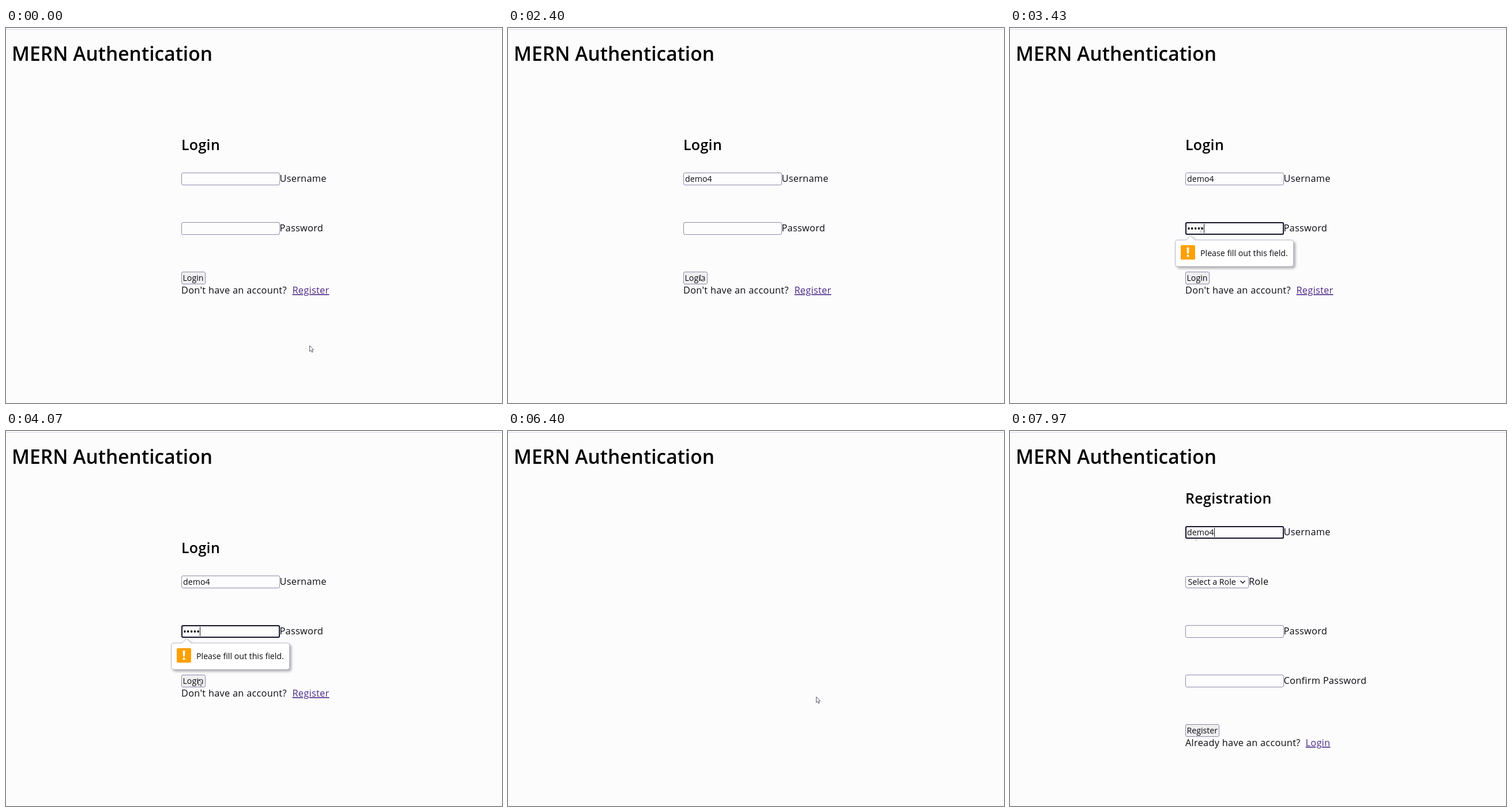
Animation, 860 px wide and 651 px high, one loop 8 s. Source, as an HTML page:

```html
<!DOCTYPE html>
<html lang="en">
<head>
<meta charset="utf-8">
<title>MERN Authentication</title>
<style>
  html, body { margin: 0; width: 100%; height: 100%; overflow: hidden; background: #fcfcfd; }
  body { position: relative; font-family: "Open Sans", "Noto Sans", sans-serif; font-weight: 500; color: #0a0a10; }
  svg { position: absolute; left: 0; top: 0; overflow: visible; }
  text { font-size: 16.3px; letter-spacing: .3px; fill: #0a0a10; }
  .h1 { font-size: 33.5px; font-weight: 600; letter-spacing: .05px; fill: #000; }
  .h2 { font-size: 25px; font-weight: 600; fill: #000; }
  .small { font-size: 14.2px; letter-spacing: 0; }
  .link { fill: #4b2a86; text-decoration: underline; text-decoration-thickness: 1px; }

  .page, .field, .focus, .val { position: absolute; box-sizing: border-box; }
  .page { inset: 0; }
  .field { left: 304px; width: 170.5px; height: 22px; background: #fdfdfe;
    border: 1px solid #8d8ba9; border-radius: 3px; }
  .focus { inset: -1px; border: 2px solid #14142c; border-radius: 3px; }
  .val { left: 2px; top: 0; height: 20px; line-height: 20px; display: flex; align-items: center; white-space: nowrap; }
  .val i { font-style: normal; font-size: 0; animation: key 8s step-end infinite; }
  .dots i { animation-name: dot; }
  .caret { width: 1px; height: 16px; background: #111; }
  .button { fill: #efeff0; stroke: #8d8ba9; }

  .step { animation: 8s step-end infinite; }
  #login { animation-name: loginPage; }
  #register { animation-name: registerPage; }
  #user .step { animation-name: userFocus; }
  #pass .step { animation-name: passFocus; }
  #name .step { animation-name: nameFocus; }
  #login .val { animation: filled 8s step-end infinite; }
  #tip { animation-name: tip; }
  #active { animation-name: active; }

  @keyframes key { 0% { font-size: 14.2px } 50%, 100% { font-size: 0 } }
  @keyframes dot { 0% { font-size: 15.5px } 50%, 100% { font-size: 0 } }
  @keyframes loginPage { 0% { opacity: 1 } 76.875%, 100% { opacity: 0 } }
  @keyframes registerPage { 0% { opacity: 0 } 82.5%, 100% { opacity: 1 } }
  @keyframes filled { 0% { opacity: 1 } 51.875%, 100% { opacity: 0 } }
  @keyframes userFocus { 0% { opacity: 0 } 10.75% { opacity: 1 } 29.375%, 100% { opacity: 0 } }
  @keyframes passFocus { 0% { opacity: 0 } 30.625% { opacity: 1 } 51.25%, 100% { opacity: 0 } }
  @keyframes nameFocus { 0% { opacity: 0 } 91.875%, 100% { opacity: 1 } }
  @keyframes tip { 0% { opacity: 0 } 30.625% { opacity: 1 } 51.875%, 100% { opacity: 0 } }
  @keyframes active { 0% { opacity: 0 } 51.25% { opacity: 1 } 66.5%, 100% { opacity: 0 } }

  #mouse { animation: move 8s ease-in-out infinite; }
  @keyframes move {
    0%, .4% { transform: translate(526px, 551px) }
    10%, 24.2% { transform: translate(333px, 260px) }
    28.8%, 34.6% { transform: translate(333px, 428px) }
    37%, 45% { transform: translate(331px, 350px) }
    50%, 65.9% { transform: translate(333px, 431px) }
    72.5%, 86.6% { transform: translate(534px, 461px) }
    91.5%, 100% { transform: translate(323px, 185px) }
  }
  #arrow { animation-name: arrow; }
  #beam { animation-name: beam; }
  #hand { animation-name: hand; }
  @keyframes arrow {
    0% { opacity: 1 } 8.6% { opacity: 0 } 25.4% { opacity: 1 } 36.4% { opacity: 0 }
    46.4% { opacity: 1 } 71% { opacity: 0 } 76.875% { opacity: 1 } 90.7%, 100% { opacity: 0 }
  }
  @keyframes beam {
    0% { opacity: 0 } 8.6% { opacity: .8 } 25.4% { opacity: 0 } 36.4% { opacity: .4 }
    46.4% { opacity: 0 } 90.7%, 100% { opacity: .35 }
  }
  @keyframes hand { 0% { opacity: 0 } 71% { opacity: 1 } 76.875%, 100% { opacity: 0 } }
</style>
</head>
<body>
<svg width="860" height="651">
  <path d="M0 2.5H860" stroke="#d9d5ea"/>
  <text class="h1" x="10" y="57">MERN Authentication</text>
</svg>

<div id="login" class="page step">
  <svg width="860" height="651">
    <text class="h2" x="304" y="212">Login</text>
    <text x="474.5" y="267">Username</text>
    <text x="474.5" y="353">Password</text>
    <rect class="button" x="304.5" y="423.5" width="41" height="21" rx="2.5"/>
    <rect id="active" class="step" x="304.5" y="423.5" width="41" height="21" rx="2.5" fill="#e0e0e3" stroke="#7f7da0"/>
    <text class="small" x="306.5" y="439">Login</text>
    <text x="304" y="461">Don't have an account?</text>
    <text class="link" x="496.5" y="461">Register</text>
  </svg>
  <div id="user" class="field" style="top:251px">
    <div class="focus step"></div>
    <div class="val" data-text="demo4" data-from="1100" data-gap="120"><b class="caret step"></b></div>
  </div>
  <div id="pass" class="field" style="top:337px">
    <div class="focus step"></div>
    <div class="val dots" data-text="•••••" data-from="2980" data-gap="95"><b class="caret step"></b></div>
  </div>
  <svg id="tip" class="step" width="860" height="651">
    <path d="M291 368H305L313 360.5L321 368H487Q491.5 368 491.5 372.5V409.5Q491.5 414 487 414H291Q286.5 414 286.5 409.5V372.5Q286.5 368 291 368Z"
      fill="#fff" stroke="#b4b2c6" style="filter:drop-shadow(3px 3px 2px rgba(0,0,0,.3))"/>
    <rect x="296" y="377" width="25" height="25" rx="2" fill="#ffa000"/>
    <path d="M306.5 381H310.5L310 391.5H307Z" fill="#fff"/>
    <circle cx="308.5" cy="395.5" r="2" fill="#fff"/>
    <text class="small" x="330" y="396" font-weight="400">Please fill out this field.</text>
  </svg>
</div>

<div id="register" class="page step">
  <svg width="860" height="651">
    <text class="h2" x="304" y="126">Registration</text>
    <text x="474.5" y="181">Username</text>
    <rect x="304.5" y="252.5" width="109" height="20" rx="2.5" fill="#fdfdfe" stroke="#8d8ba9"/>
    <text class="small" x="308.5" y="267">Select a Role</text>
    <path d="M399.5 260L403.5 264L407.5 260" fill="none" stroke="#15151f" stroke-width="1.5"/>
    <text x="414" y="267">Role</text>
    <text x="474.5" y="353">Password</text>
    <text x="474.5" y="439">Confirm Password</text>
    <rect class="button" x="304.5" y="509.5" width="58" height="21" rx="2.5"/>
    <text class="small" x="306.5" y="525">Register</text>
    <text x="304" y="547">Already have an account?</text>
    <text class="link" x="512.5" y="547">Login</text>
  </svg>
  <div id="name" class="field" style="top:165px">
    <div class="focus step"></div>
    <div class="val" data-text="demo4" data-from="7420" data-gap="115"><b class="caret step"></b></div>
  </div>
  <div class="field" style="top:337px"></div>
  <div class="field" style="top:423px"></div>
</div>

<svg width="860" height="651">
  <g id="mouse" stroke="#4a4a5c" fill="#fff">
    <path id="arrow" class="step" d="M.5 .5V10.5L2.8 8.5L4.5 12L6 11.3L4.5 7.8H7.5Z" stroke-width=".9"/>
    <path id="beam" class="step" d="M-2 -4.5H2M0 -4.5V4.5M-2 4.5H2" fill="none"/>
    <path id="hand" class="step" d="M-1 1Q0 -.5 1 1V6L6 7.5Q7.5 8 7 10L6 15H-1L-4.5 9.5Q-4 8 -1 10Z" stroke-width=".9"/>
  </g>
</svg>

<script>
  // Split each typed value into keys that appear one after another.
  for (const val of document.querySelectorAll('.val')) {
    const { text, from, gap } = val.dataset;
    [...text].forEach((char, n) => {
      const key = document.createElement('i');
      key.textContent = char;
      key.style.animationDelay = +from + n * gap + 'ms';
      val.insertBefore(key, val.lastElementChild);
    });
  }
</script>
</body>
</html>
```
